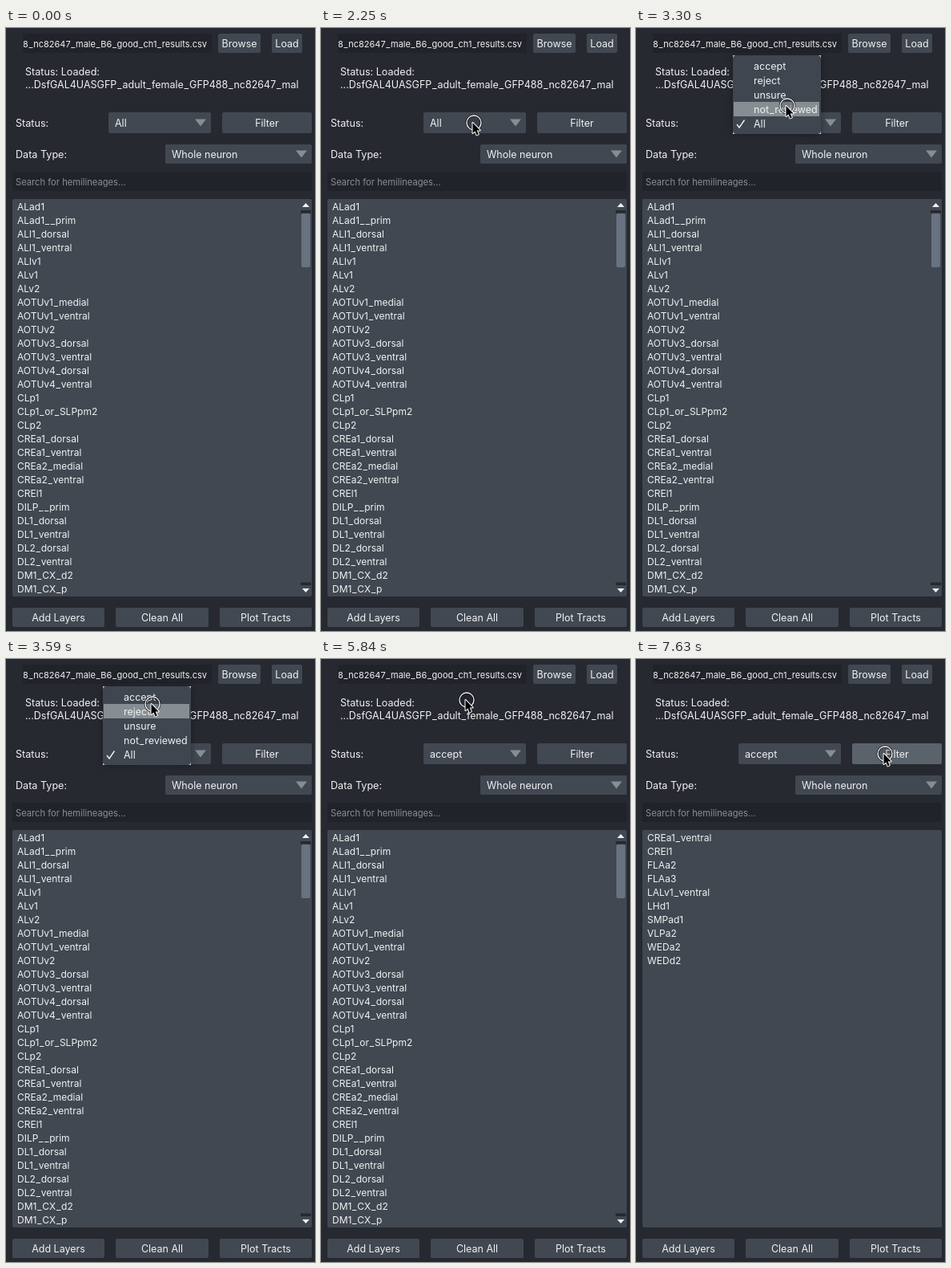
These frames come from a looping animation (386x751 px, 8 s). An HTML page with a canvas:

```html
<!DOCTYPE html>
<html lang="en">
<head>
<meta charset="utf-8">
<title>Hemilineage filter panel</title>
<style>
  html, body { margin: 0; width: 100%; height: 100%; overflow: hidden; background: #262930; }
  canvas { display: block; width: 386px; height: 751px; }
</style>
</head>
<body>
<canvas id="stage"></canvas>
<script>
const W = 386, H = 751, LOOP = 8000;
const BG = '#262930', FIELD = '#202329', PANEL = '#414851', HOVER = '#5a626c',
      LIGHT = '#868e93', TEXT = '#f0f1f2';
const canvas = document.getElementById('stage');
const ctx = canvas.getContext('2d');
const scale = window.devicePixelRatio || 1;
canvas.width = W * scale;
canvas.height = H * scale;

const allRows = ('ALad1 ALad1__prim ALl1_dorsal ALl1_ventral ALlv1 ALv1 ALv2 AOTUv1_medial ' +
  'AOTUv1_ventral AOTUv2 AOTUv3_dorsal AOTUv3_ventral AOTUv4_dorsal AOTUv4_ventral CLp1 ' +
  'CLp1_or_SLPpm2 CLp2 CREa1_dorsal CREa1_ventral CREa2_medial CREa2_ventral CREl1 ' +
  'DILP__prim DL1_dorsal DL1_ventral DL2_dorsal DL2_ventral DM1_CX_d2 DM1_CX_p').split(' ');
const acceptedRows = ('CREa1_ventral CREl1 FLAa2 FLAa3 LALv1_ventral LHd1 SMPad1 VLPa2 ' +
  'WEDa2 WEDd2').split(' ');
const options = ['accept', 'reject', 'unsure', 'not_reviewed', 'All'];

// Everything after START moves in ticks of STEP ms.
const START = 1200, STEP = 149.3;
const MENU_OPEN = 9, MENU_CLOSE = 31, FILTER_HOVER = 36, FILTERED = 43;
const MENU_TOP = 38, ROW = 18;

// Pointer stops: tick, place, and the power that eases the way there.
const HOLD = Infinity;
const stops = [
  { tick: 0, x: -8, y: 328 },
  { tick: 1, x: 135, y: 292, ease: 1 },
  { tick: 2, x: 138, y: 290, ease: 1 },
  { tick: 4, x: 171, y: 148, ease: 2 },
  { tick: 7, x: 191, y: 118, ease: 0.5 },
  { tick: 14, x: 189, y: 97, ease: HOLD },
  { tick: 16, x: 183, y: 56, ease: 0.7 },
  { tick: 19, x: 182, y: 51, ease: 2 },
  { tick: 33, x: 213, y: 61, ease: HOLD },
  { tick: 35, x: 302, y: 102, ease: 0.4 },
  { tick: 37, x: 311, y: 118, ease: 1 }
];

function pointerAt(tick) {
  const next = stops.findIndex(s => s.tick > tick);
  if (next < 0) return stops[stops.length - 1];
  const a = stops[next - 1], b = stops[next];
  const p = ((tick - a.tick) / (b.tick - a.tick)) ** b.ease;
  return { x: a.x + (b.x - a.x) * p, y: a.y + (b.y - a.y) * p };
}

function box(x, y, w, h, color, r = 2) {
  ctx.fillStyle = color;
  ctx.beginPath();
  ctx.roundRect(x, y, w, h, r);
  ctx.fill();
}

// y is the middle of the capitals; underscores get a little extra room.
function text(str, x, y, size = 12.5, color = TEXT, align = 0) {
  ctx.font = size + 'px Inter, "Open Sans", sans-serif';
  ctx.fillStyle = color;
  const gap = size * 0.12;
  const parts = str.split(/(_)/);
  const widths = parts.map(p => ctx.measureText(p).width + (p === '_' ? gap : 0));
  x -= align * widths.reduce((a, b) => a + b);
  parts.forEach((p, i) => {
    ctx.fillText(p, x + (p === '_' ? gap / 2 : 0), y + size * 0.364);
    x += widths[i];
  });
}

function trace(points) {
  ctx.beginPath();
  points.forEach(([x, y]) => ctx.lineTo(x, y));
}

function triangle(x, y, half, rise, color) {
  trace([[x - half, y - rise], [x + half, y - rise], [x, y + rise]]);
  ctx.fillStyle = color;
  ctx.fill();
}

function button(label, x, y, w, h, color = PANEL) {
  box(x, y, w, h, color);
  text(label, x + w / 2, y + h / 2, 12.5, TEXT, 0.5);
}

function combo(label, x, y, w, h) {
  const mid = y + h / 2;
  box(x, y, w, h, PANEL);
  text(label, x + 8, mid);
  triangle(x + w - 13, mid, 7, 4.5, LIGHT);
}

function list(rows, scrollbar) {
  box(8, 213, 374, 495, PANEL);
  rows.forEach((name, i) => text(name, 14, 222.5 + 17 * i, 12));
  if (!scrollbar) return;
  box(368, 227, 13, 3.5, BG, 0);
  box(368, 690.5, 13, 3.5, BG, 0);
  box(369, 231, 11, 67, '#687281');
  triangle(374.5, 220.5, 4.5, -2.5, TEXT);
  triangle(374.5, 700.5, 4.5, 2.5, TEXT);
}

function menu(active) {
  ctx.save();
  ctx.shadowColor = 'rgba(0,0,0,0.35)';
  ctx.shadowBlur = 8 * scale;
  box(121, 34, 110, 98, '#dfe1e3', 0);
  ctx.restore();
  box(121, 34, 110, 98, '#3f4650', 4);
  box(122, MENU_TOP + ROW * active, 107, ROW, LIGHT, 0);
  options.forEach((name, i) => text(name, 147, MENU_TOP + 9.5 + ROW * i));
  trace([[126, 120], [129, 124], [135.5, 114.5]]);
  ctx.strokeStyle = TEXT;
  ctx.lineWidth = 1.4;
  ctx.stroke();
}

function outline(color, width) {
  ctx.strokeStyle = color;
  ctx.lineWidth = width;
  ctx.stroke();
}

function pointer({ x, y }) {
  ctx.save();
  ctx.translate(x, y);
  ctx.lineJoin = 'round';
  ctx.beginPath();
  ctx.arc(0, 0, 9, 0, Math.PI * 2);
  ctx.fillStyle = 'rgba(0,0,0,0.12)';
  ctx.fill();
  outline('rgba(20,22,26,0.75)', 3);
  outline('#f4f5f6', 1.3);

  ctx.translate(-1.5, 0);
  trace([[0, 0], [0, 13], [3, 10.4], [5, 15.4], [7.3, 14.4], [5.2, 9.6], [9.2, 9.4]]);
  ctx.closePath();
  outline('#fff', 2);
  ctx.fillStyle = '#000';
  ctx.fill();
  ctx.restore();
}

function fileRow() {
  box(21, 7, 236, 24, FIELD);
  ctx.save();
  ctx.beginPath();
  ctx.rect(22, 7, 235, 24);
  ctx.clip();
  text('GFP488_nc82647_male_B6_good_ch1_results.csv', 251, 19.5, 11, TEXT, 1);
  ctx.restore();
  button('Browse', 265, 7, 53, 24);
  button('Load', 332, 7, 38, 24);
}

function draw(t) {
  const tick = Math.floor((t - START) / STEP);
  const filtered = tick >= FILTERED;
  ctx.setTransform(scale, 0, 0, scale, 0, 0);
  ctx.fillStyle = BG;
  ctx.fillRect(0, 0, W, H);

  fileRow();
  text('Status: Loaded:', 24, 54.5, 12.6);
  text('...DsfGAL4UASGFP_adult_female_GFP488_nc82647_mal', 24, 70.5);
  text('Status:', 12, 118.5, 12.6);
  combo(tick < MENU_CLOSE ? 'All' : 'accept', 128, 105, 128, 26);
  button('Filter', 270, 105, 112, 26, tick < FILTER_HOVER ? PANEL : HOVER);
  text('Data Type:', 12, 157.5, 12.6);
  combo('Whole neuron', 199, 145, 183, 24);
  box(8, 179, 374, 24, FIELD);
  text('Search for hemilineages...', 12, 191.5, 11.2, '#8b8e92');

  list(filtered ? acceptedRows : allRows, !filtered);
  button('Add Layers', 8, 722, 115, 24);
  button('Clean All', 137, 722, 116, 24);
  button('Plot Tracts', 267, 722, 115, 24);

  if (tick < 0) return;
  const at = pointerAt(tick);
  if (tick >= MENU_OPEN && tick < MENU_CLOSE) menu(Math.floor((at.y + 3 - MENU_TOP) / ROW));
  pointer(at);
}

const start = performance.now();
function frame(now) {
  draw(Math.max(0, now - start) % LOOP);
  requestAnimationFrame(frame);
}
draw(0);
requestAnimationFrame(frame);
</script>
</body>
</html>
```
